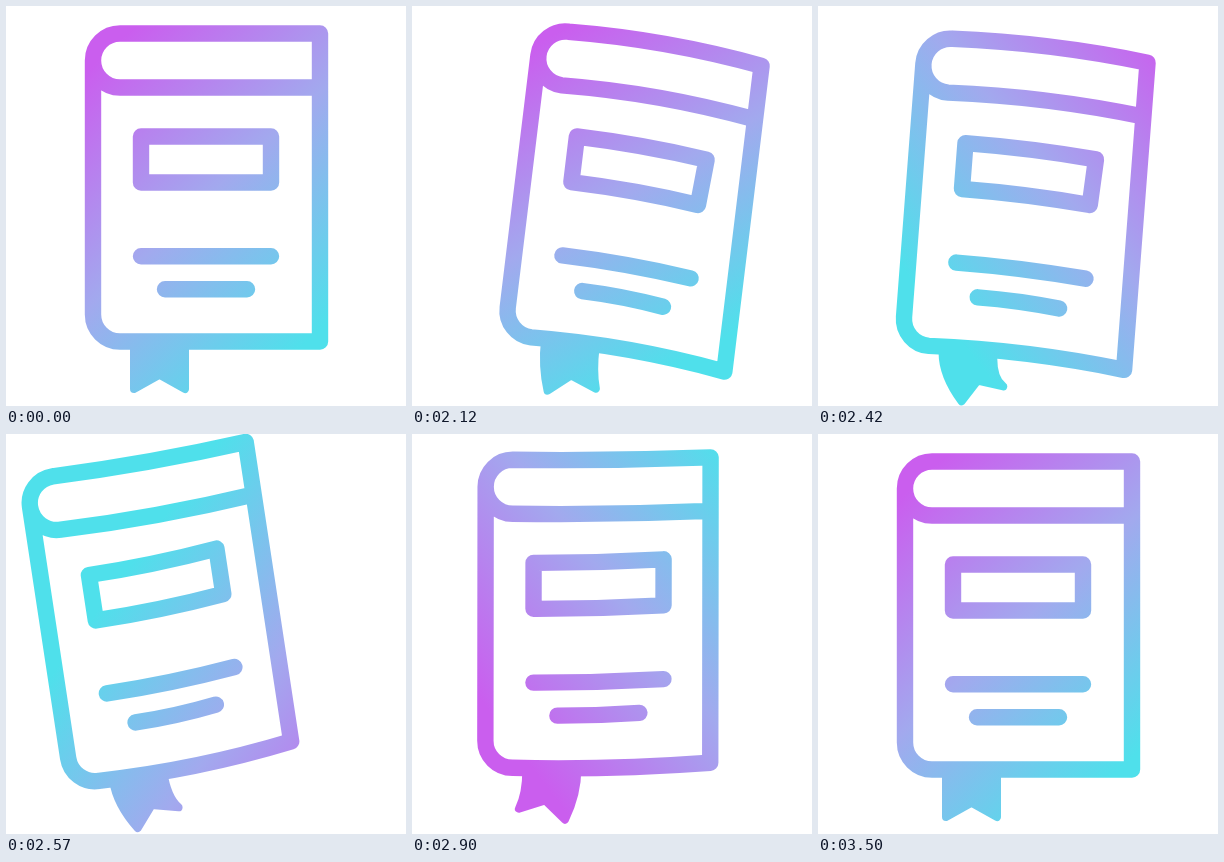
Animation, 400 px wide and 400 px high, one loop 3.52 s. Source, as an HTML page with a canvas:

```html
<!DOCTYPE html>
<html lang="en">
<head>
<meta charset="utf-8">
<title>Book</title>
<style>
html, body { margin: 0; width: 100%; height: 100%; overflow: hidden; background: #fff; }
canvas { display: block; width: 400px; height: 400px; }
</style>
</head>
<body>
<canvas id="stage" width="400" height="400"></canvas>
<script>
const LOOP = 3520;
const ctx = document.getElementById('stage').getContext('2d');
const rad = deg => deg * Math.PI / 180;
const clamp = (v, lo, hi) => Math.min(hi, Math.max(lo, v));

// The book rests, leans right, whips left, lingers, sways right and settles
const beats = [2000, 2300, 2570, 2770, 3050, 3500];

// Smooth curve through one value per beat; it overshoots a little at the turns
function spline(t, values) {
  const last = beats.length - 1;
  const at = clamp(t, beats[0], beats[last]);
  const i = clamp(beats.findIndex(b => b > at), 1, last) - 1 + (at === beats[last] ? last - 1 : 0);
  const slope = n => {
    const a = Math.max(n - 1, 0), b = Math.min(n + 1, last);
    return (values[b] - values[a]) / (beats[b] - beats[a]);
  };
  if (i >= last - 1 && at === beats[last]) return values[last];
  const h = beats[i + 1] - beats[i], u = (at - beats[i]) / h, v = 1 - u;
  return values[i] * v * v * (1 + 2 * u) + values[i + 1] * u * u * (1 + 2 * v) +
    h * u * v * (v * slope(i) - u * slope(i + 1));
}

function draw(t) {
  const sway = (...inner) => spline(t, [0, ...inner, 0]);
  const tilt = sway(13, -8.6, -3.6, 2.9);
  const x = 114 + sway(72, -63, -45, 16);
  const y = 54.5 + sway(-2.5, 14.5, 3.5, -5);
  const bend = sway(20, -10, -16, 6.5);
  const swing = sway(-7.5, -27, 27, -9);
  const glow = sway(0, -76, 0, 30);
  const angle = rad(47 + spline(t, [0, 43, 168, 235, 313, 360]));

  const topBend = bend > 0 ? bend : bend / 2;
  const right = 314 - Math.min(4.5, Math.abs(bend) * 0.4);
  const droop = x1 => bend * ((x1 - 114) / 200) ** 1.3;

  // Nearly horizontal curve whose right end sinks by `sink`; `hump` delays the sinking
  const edge = (x0, x1, y0, sink, hump = 0) =>
    ctx.quadraticCurveTo((x0 + x1) / 2, y0 - sink * hump, x1, y0 + sink);
  const coverEdge = (y0, sink) => edge(114, right, y0, sink, 0.4);
  const line = (x0, x1, y0) => {
    ctx.moveTo(x0, y0);
    edge(x0, x1, y0, droop(x1));
  };

  ctx.setTransform(1, 0, 0, 1, 0, 0);
  ctx.globalCompositeOperation = 'source-over';
  ctx.fillStyle = '#000';
  ctx.clearRect(0, 0, 400, 400);
  ctx.translate(x, y);
  ctx.rotate(rad(tilt));
  ctx.translate(-114, -54.5);
  ctx.lineCap = ctx.lineJoin = 'round';
  ctx.lineWidth = 16.4;

  // Cover
  ctx.beginPath();
  ctx.moveTo(114, 27.5);
  coverEdge(27.5, topBend);
  ctx.lineTo(right, 335.5 + bend);
  ctx.moveTo(114, 27.5);
  ctx.arc(114, 54.5, 27, -Math.PI / 2, Math.PI, true);
  ctx.arc(114, 308.5, 27, Math.PI, Math.PI / 2, true);
  coverEdge(335.5, bend);

  // Page block
  ctx.moveTo(87, 54.5);
  ctx.arc(114, 54.5, 27, Math.PI, Math.PI / 2, true);
  coverEdge(81.5, topBend + (bend - topBend) * 0.18);

  // Label
  const lean = Math.max(bend, 0) * 0.15, fall = droop(265);
  ctx.moveTo(135, 130.5);
  edge(135, 265 + lean, 130.5, fall);
  ctx.lineTo(265 - lean, 176.5 + fall);
  ctx.quadraticCurveTo(200, 176.5, 135, 176.5);
  ctx.closePath();

  line(135, 265, 250.3);
  line(159, 241, 283.3);
  ctx.stroke();

  // Ribbon: its tip swings around the middle of its top
  const turn = rad(swing - tilt), half = 25.5 - Math.abs(turn) * 8;
  const tip = (dx, dy) => [
    153.5 + dx * Math.cos(turn) - dy * Math.sin(turn),
    340 + dx * Math.sin(turn) + dy * Math.cos(turn)
  ];
  ctx.lineWidth = 8;
  ctx.beginPath();
  ctx.moveTo(128, 337);
  ctx.quadraticCurveTo(128, 362, ...tip(-half, 43));
  ctx.lineTo(...tip(0, 28.8));
  ctx.lineTo(...tip(half, 43));
  ctx.quadraticCurveTo(179, 362, 179, 337);
  ctx.closePath();
  ctx.fill();
  ctx.stroke();

  // Colour everything with the turning gradient
  ctx.setTransform(1, 0, 0, 1, 0, 0);
  const along = d => [202 + Math.cos(angle) * d, 190 + Math.sin(angle) * d];
  const paint = ctx.createLinearGradient(...along(glow - 174), ...along(glow + 174));
  paint.addColorStop(0, '#ca5eee');
  paint.addColorStop(0.5, '#a2a9ee');
  paint.addColorStop(1, '#4fe0eb');
  ctx.globalCompositeOperation = 'source-in';
  ctx.fillStyle = paint;
  ctx.fillRect(0, 0, 400, 400);
}

const start = performance.now();
function tick() {
  draw((performance.now() - start) % LOOP);
  requestAnimationFrame(tick);
}
tick();
</script>
</body>
</html>
```
